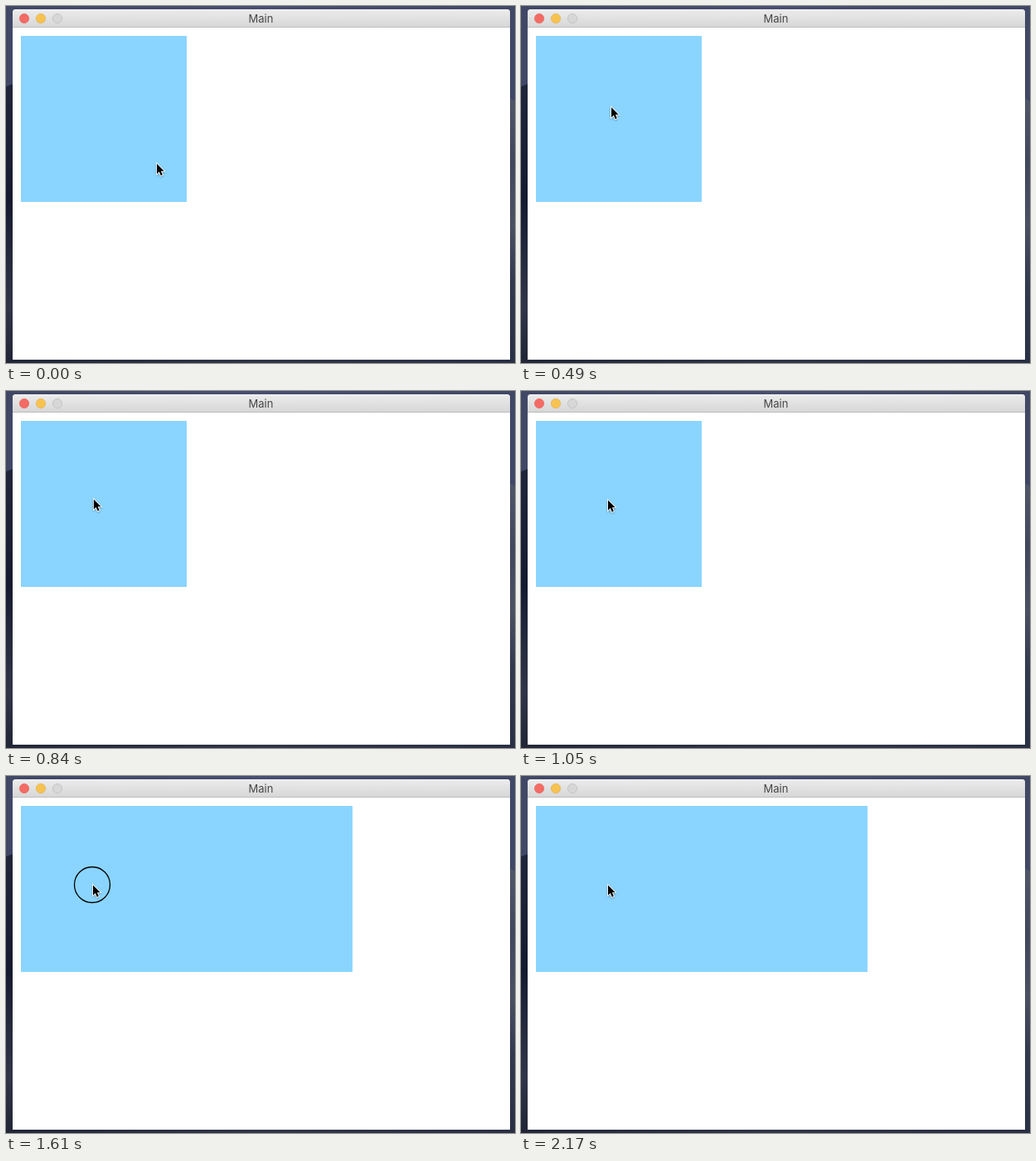
Write an HTML page that moves like this. It is 614 by 430 pixels and loops after 2.24 s.

```html
<!DOCTYPE html>
<html lang="en">
<head>
<meta charset="utf-8">
<title>Main</title>
<style>
  html, body { margin: 0; width: 100%; height: 100%; overflow: hidden; }
  svg { display: block; width: 614px; height: 430px; }
  text { font: 13px Inter, "Open Sans", sans-serif; fill: #464646; text-anchor: middle; }
</style>
</head>
<body>
<svg viewBox="0 0 614 430">
  <defs>
    <linearGradient id="sky">
      <stop offset="0" stop-color="#404866"/>
      <stop offset=".5" stop-color="#474e70"/>
      <stop offset="1" stop-color="#414866"/>
    </linearGradient>
    <linearGradient id="left" x2="0" y2="1">
      <stop offset="0" stop-color="#20263a"/>
      <stop offset=".42" stop-color="#141b31"/>
      <stop offset=".6" stop-color="#23293d"/>
      <stop offset=".8" stop-color="#303548"/>
      <stop offset="1" stop-color="#202536"/>
    </linearGradient>
    <linearGradient id="right" x2="0" y2="1">
      <stop offset="0" stop-color="#51566a"/>
      <stop offset=".25" stop-color="#41475d"/>
      <stop offset=".48" stop-color="#4b5064"/>
      <stop offset=".7" stop-color="#33394f"/>
      <stop offset="1" stop-color="#2a3044"/>
    </linearGradient>
    <linearGradient id="ground">
      <stop offset="0" stop-color="#222738"/>
      <stop offset=".5" stop-color="#303548"/>
      <stop offset="1" stop-color="#2a3044"/>
    </linearGradient>
    <linearGradient id="bar" x2="0" y2="1">
      <stop offset="0" stop-color="#ececec"/>
      <stop offset="1" stop-color="#d6d6d6"/>
    </linearGradient>
    <filter id="soft" x="-50%" y="-50%" width="200%" height="200%">
      <feDropShadow dx="0" dy="1" stdDeviation="1" flood-opacity=".35"/>
    </filter>
  </defs>

  <rect width="614" height="430" fill="url(#sky)"/>
  <path d="M0 97L8 94V430H0Z" fill="url(#left)"/>
  <path d="M608 111L614 115V430H608Z" fill="url(#right)"/>
  <rect y="426" width="614" height="4" fill="url(#ground)"/>

  <path d="M8 426V8a4 4 0 0 1 4-4H604a4 4 0 0 1 4 4V426Z" fill="#fff"/>
  <path d="M8 26V8a4 4 0 0 1 4-4H604a4 4 0 0 1 4 4V26Z" fill="url(#bar)"/>
  <path d="M11 4.5H605" stroke="#f5f5f5"/>
  <path d="M8 25.5H608" stroke="#bdbdbd"/>
  <circle cx="22" cy="15" r="5.7" fill="#f36b64" stroke="#e2645d" stroke-width=".6"/>
  <circle cx="42" cy="15" r="5.7" fill="#f6c351" stroke="#e0ae48" stroke-width=".6"/>
  <circle cx="62" cy="15" r="5.6" fill="#d7d7d7" stroke="#c2c2c2" stroke-width=".9"/>
  <text x="307.5" y="20">Main</text>

  <rect id="box" x="18" y="36" width="200" height="200" fill="#8ad5ff"/>
  <circle id="ring" cx="104" cy="131" r="21.5" fill="none" stroke="#000" stroke-width="1.3"/>
  <path id="cursor" d="M0 0V12.2L2.8 9.6L4.8 14.2L6.8 13.3L4.9 8.8H8.7Z"
        stroke="#fff" stroke-width="1.6" paint-order="stroke" filter="url(#soft)"/>
</svg>
<script>
  const LOOP = 2240, STEP = 70;
  const box = document.getElementById('box');
  const ring = document.getElementById('ring');
  const cursor = document.getElementById('cursor');

  // Pointer waypoints: time, x, y
  const path = [
    [70, 182, 190],
    [490, 109, 122],
    [700, 106.3, 129.8],
    [1050, 105, 131.5]
  ];
  const ease = p => p * p * (3 - 2 * p);

  function pointerAt(t) {
    if (t <= path[0][0]) return path[0].slice(1);
    for (let i = 1; i < path.length; i++) {
      const [t0, x0, y0] = path[i - 1], [t1, x1, y1] = path[i];
      if (t < t1) {
        const p = ease((t - t0) / (t1 - t0));
        return [x0 + (x1 - x0) * p, y0 + (y1 - y0) * p];
      }
    }
    return path[path.length - 1].slice(1);
  }

  function draw() {
    const t = Math.floor(performance.now() % LOOP / STEP) * STEP;
    cursor.setAttribute('transform', `translate(${pointerAt(t)})`);
    box.setAttribute('width', t >= 1610 ? 400 : 200);
    ring.setAttribute('visibility', t >= 1540 && t < 1680 ? 'visible' : 'hidden');
    requestAnimationFrame(draw);
  }
  draw();
</script>
</body>
</html>
```
